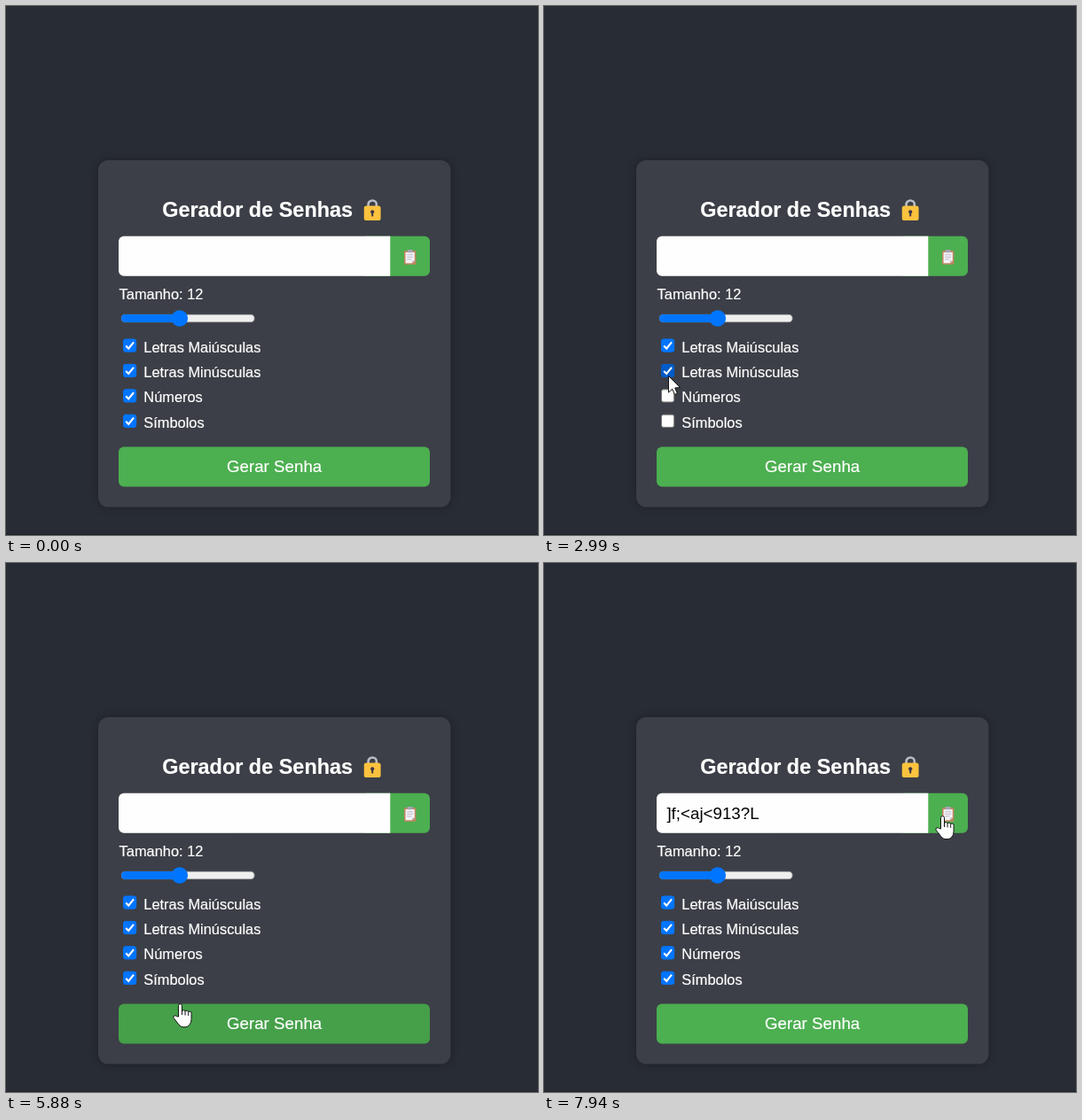
These frames come from a looping animation (600x597 px, 8000 ms). An HTML page:

```html
<!DOCTYPE html>
<html lang="pt">
<head>
<meta charset="utf-8">
<title>Gerador de Senhas</title>
<style>
  html, body { margin: 0; width: 100%; height: 100%; overflow: hidden; background: #282c34; }
  svg { display: block; width: 100vw; height: 100vh; }
  text { font-family: "Liberation Sans", Arial, sans-serif; font-size: 16.4px; fill: #fff; stroke: #fff; stroke-width: .2; }
  .title { font-size: 23.45px; font-weight: bold; }
  .big { font-size: 18.75px; }
  .card { fill: #3c3f47; filter: drop-shadow(0 0 5px rgba(0, 0, 0, .3)); }
  .green { fill: #4caf50; }
  .cursor { fill: #fff; stroke: #111; stroke-width: 1; stroke-linejoin: round; }
  #password { fill: #000; stroke: none; }
</style>
</head>
<body>
<svg viewBox="0 0 600 597" preserveAspectRatio="none">
  <rect width="600" height="597" fill="#282c34"/>
  <rect y="596" width="600" height="1" fill="#1f232a"/>
  <rect class="card" x="104" y="174" width="397.5" height="391.5" rx="11.5"/>

  <text class="title" x="176.2" y="238.4">Gerador de Senhas</text>
  <g id="lock">
    <path d="M408.6 227V223.6a4.6 4.1 0 0 1 9.2 0V227" fill="none" stroke="#b9bdc6" stroke-width="2.6"/>
    <rect x="403.8" y="225.6" width="18.8" height="16.4" rx="2.6" fill="#fdc23e"/>
    <circle cx="413.2" cy="232.3" r="2.1" fill="#3d3548"/>
    <path d="M412.2 233h2v4.4h-2z" fill="#3d3548"/>
  </g>

  <rect class="green" x="400" y="259.7" width="78" height="45" rx="6"/>
  <path d="M433.3 259.7H133a6 6 0 0 0-6 6v33a6 6 0 0 0 6 6h300.3z" fill="#fefefe"/>
  <g id="clipboard">
    <rect x="449" y="276" width="13.4" height="15.8" rx="1.6" fill="#c08661"/>
    <path d="M450.6 278h10.2v9.2l-3 3h-7.2z" fill="#f4f2f7"/>
    <path d="M460.8 287.2h-3v3z" fill="#c9c5d2"/>
    <rect x="452.6" y="275" width="6.2" height="3.2" rx="1" fill="#a7a4b3"/>
    <path d="M452.2 280.8h7M452.2 283.3h7M452.2 285.8h5" stroke="#b6b3c4" stroke-width=".9"/>
  </g>
  <text class="big" id="password" x="138.4" y="288.7">]f;&lt;aj&lt;913?L</text>

  <text x="127.6" y="331">Tamanho: 12</text>
  <rect x="130.4" y="348.4" width="149.6" height="8.2" rx="4.1" fill="#efefef" stroke="#b2b2b2" stroke-width=".9"/>
  <rect x="130" y="348" width="70" height="9" rx="4.5" fill="#0075ff"/>
  <circle cx="195.8" cy="352.5" r="9.3" fill="#0075ff"/>

  <g id="options"></g>

  <rect class="green" id="generate" x="127" y="497.4" width="351" height="45" rx="6"/>
  <text class="big" x="302.6" y="526" text-anchor="middle">Gerar Senha</text>

  <path id="arrow" class="cursor" d="M.5.6V19.2L4.7 15.3 7.4 21.6 10.4 20.3 7.7 14.1 13.5 13.7Z"/>
  <g id="hand" class="cursor">
    <path d="M-2 15V2.6a2 2 0 0 1 4 0V9.2a1.8 1.8 0 0 1 3.6.3 1.8 1.8 0 0 1 3.6.9 1.7 1.7 0 0 1 3.4.7V18
      q0 4-2.4 6.4a6 6 0 0 1-4.4 2.2H3.4q-3 0-5-2.8L-7.2 16.6q-1-1.8.4-2.7 1.6-.7 2.9.7Z"/>
    <path d="M2 9v4M5.6 9.8v3.6M9.2 10.8v3" fill="none"/>
  </g>
</svg>
<script>
  const LOOP = 8000;
  const PRESS = 75;
  const TRAVEL = 200;
  const PASSWORD_AT = 6700;
  const $ = id => document.getElementById(id);
  const rowTop = i => 375.5 + 28.4 * i;

  const options = ["Letras Maiúsculas", "Letras Minúsculas", "Números", "Símbolos"].map((label, i) => {
    $("options").insertAdjacentHTML("beforeend", `<g transform="translate(132 ${rowTop(i)})">
      <rect x=".5" y=".5" width="14.2" height="14.2" rx="2.2"/>
      <path d="M3.2 8 6.2 11.1 12 3.9" fill="none" stroke="#fff" stroke-width="2.1"/>
      <text x="23.3" y="15.2">${label}</text></g>`);
    const [box, tick] = $("options").lastElementChild.children;
    return { box, tick };
  });

  // Options are switched off from the bottom up, then on again from the top down.
  const clicks = [3, 2, 1, 0, 0, 1, 2, 3].map((option, k) => ({ option, time: 2295 + 490 * k }));

  // The pointer stops just short of each box: low on the way up, high on the way down.
  const rowMoves = clicks.slice(1).map(({ option }, k) => {
    const leave = clicks[k].time;
    const goingUp = k < 3;
    return { leave, arrive: leave + TRAVEL, x: goingUp ? 140 : 135, y: rowTop(option) + (goingUp ? 13 : 6) };
  });

  const entry = { x: 508, y: 586 };
  const moves = [
    { leave: 450, arrive: 1200, x: 215, y: 510 },
    { leave: 1200, arrive: 2040, x: 139, y: 473 },
    ...rowMoves,
    { leave: clicks[7].time, arrive: 6350, x: 255, y: 526 },
    { leave: 6770, arrive: 7190, x: 433, y: 368 },
    { leave: 7190, arrive: 7700, x: 449.5, y: 285 }
  ];

  const easeOut = u => 1 - (1 - u) ** 2.5;
  const inside = (p, x, y, w, h) => p.x >= x && p.x <= x + w && p.y >= y && p.y <= y + h;

  function pointerAt(t) {
    if (t < moves[0].leave) return { x: -50, y: -50 };
    const i = moves.findLastIndex(m => t >= m.leave);
    const from = moves[i - 1] || entry, to = moves[i];
    const u = easeOut(Math.min(1, (t - to.leave) / (to.arrive - to.leave)));
    return { x: from.x + (to.x - from.x) * u, y: from.y + (to.y - from.y) * u };
  }

  function drawOption({ box, tick }, i, t, pointer) {
    const times = clicks.filter(c => c.option === i).map(c => c.time);
    const checked = times.filter(time => t >= time).length % 2 === 0;
    const pressed = times.some(time => t >= time - PRESS && t < time);
    const hovered = inside(pointer, 131, rowTop(i) - 1, 17, 18);
    const state = pressed ? 2 : hovered ? 1 : 0;
    const blue = ["#0075ff", "#005cc8", "#3793ff"][state];
    const grey = ["#767676", "#4f4f4f", "#8d8d8d"][state];
    box.setAttribute("fill", checked ? blue : "#fff");
    box.setAttribute("stroke", checked ? blue : grey);
    tick.style.display = checked ? "" : "none";
  }

  function draw(t) {
    const pointer = pointerAt(t);
    const onGenerate = inside(pointer, 127, 497, 351, 46);
    const onCopy = inside(pointer, 433, 260, 45, 45);
    const isHand = onGenerate || onCopy;
    options.forEach((option, i) => drawOption(option, i, t, pointer));
    $("generate").style.fill = onGenerate ? "#45a049" : "";
    $("password").style.display = t >= PASSWORD_AT ? "" : "none";
    for (const [id, shown] of [["arrow", !isHand], ["hand", isHand]]) {
      $(id).style.display = shown ? "" : "none";
      $(id).setAttribute("transform", `translate(${pointer.x} ${pointer.y})`);
    }
  }

  const start = performance.now();
  function tick() {
    draw((performance.now() - start) % LOOP);
    requestAnimationFrame(tick);
  }
  tick();
</script>
</body>
</html>
```
